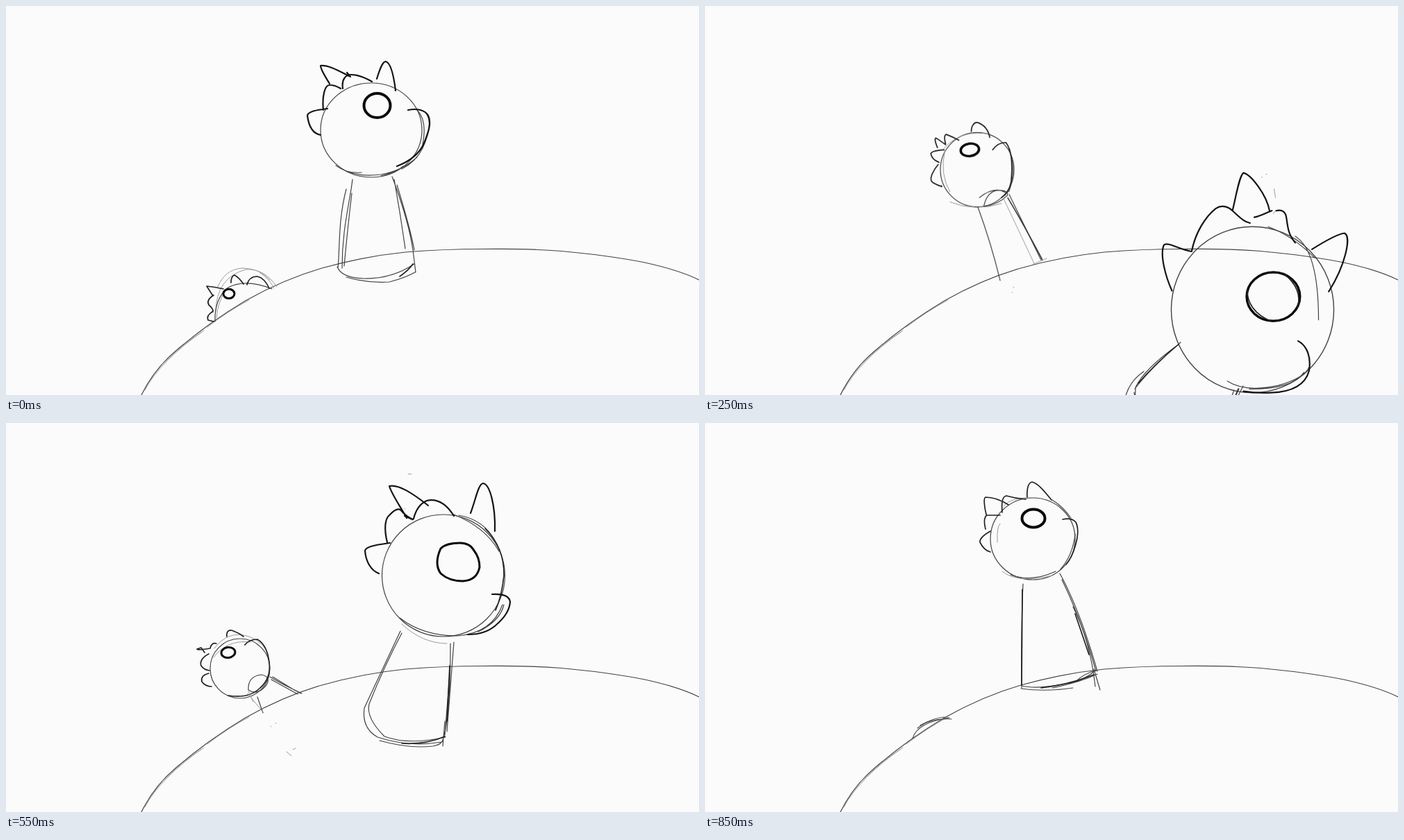
An HTML page without scripts for the animation above (900 ms loop, 998 px wide and 561 px high).

```html
<!DOCTYPE html>
<html lang="en">
<head>
<meta charset="utf-8">
<title>Hopping creature, pencil test</title>
<style>
  html, body { margin: 0; width: 100%; height: 100%; overflow: hidden; background: #fbfbfb; }
  svg { display: block; width: 998px; height: 561px; }
  path, ellipse {
    fill: none; stroke: #424242; stroke-width: 1.2;
    stroke-linecap: round; stroke-linejoin: round; vector-effect: non-scaling-stroke;
  }
  .bold { stroke: #141414; stroke-width: 2.2; }
  .mid { stroke: #222; stroke-width: 1.7; }
  .eye { stroke: #0a0a0a; stroke-width: 4; }
  .eye.slim { stroke-width: 3; }
  .faint { stroke: #9a9a9a; stroke-width: 1; }

  /* Nine drawings, 50 ms each */
  .pose {
    visibility: hidden;
    animation: show 450ms step-end infinite;
    animation-delay: calc(var(--i) * 50ms - 450ms);
  }
  @keyframes show {
    0% { visibility: visible; }
    11.1111%, 100% { visibility: hidden; }
  }
</style>
</head>
<body>
<svg viewBox="0 0 998 561">
  <filter id="pencil" filterUnits="userSpaceOnUse" x="0" y="0" width="998" height="561" color-interpolation-filters="sRGB">
    <feTurbulence type="fractalNoise" baseFrequency=".6" numOctaves="2" seed="4"/>
    <feDisplacementMap in="SourceGraphic" scale="1.3" xChannelSelector="R" yChannelSelector="G"/>
  </filter>

  <g filter="url(#pencil)">
    <g id="hill">
      <path d="M195 561Q213 524 245 497Q290 458 345 425Q400 394 455 378Q515 361 575 355Q630 350.500 685 350.500Q750 349.500 800 353.500Q870 360 920 370Q970 381 998 395"/>
      <path class="faint" d="M200 554Q222 512 285 468M225 517Q255 487 282 470M290 463Q320 440 350 424"/>
    </g>

    <g class="pose" style="--i:0">
      <g id="peek">
        <path class="faint" d="M302 440Q303 392 345 380Q372 378 390 405M305 405Q315 380 340 378Q365 378 380 395M303 450Q305 425 318 408M365 384Q380 394 386 407"/>
        <path d="M301 455Q300 422 320 406Q345 393 383 408"/>
        <path class="mid" d="M313 408Q300 405 289 404L298 418M299 417Q288 424 292 431Q299 437 298 441M297 441Q288 447 291 453L299 455M324 399Q324 390 329 388Q336 392 342 401M347 402Q350 390 362 390Q372 392 379 407"/>
        <ellipse class="eye slim" cx="321" cy="415" rx="8" ry="6.700"/>
      </g>
      <g id="tall">
        <ellipse cx="526" cy="179" rx="73" ry="68"/>
        <path d="M475 230Q500 248 540 243Q570 238 592 218M490 238Q500 241 512 240M540 245Q562 240 572 231M605 155Q616 170 600 205Q590 225 570 235M592 150Q607 165 600 200"/>
        <path class="bold" d="M466 112C460 102 453 92 453 86C465 85 480 94 494 101M491 96L496 102M485 119C483 106 489 99 497 99Q510 99 527 109M457 150C455 130 459 114 466 114Q474 114 482 119M463 148C447 150 435 152 434 158C436 174 442 184 453 186M534 105C538 92 542 80 547 80C553 82 558 97 561 122M579 150C594 147 604 151 608 158C614 170 606 187 602 198Q592 220 563 231"/>
        <ellipse class="eye" cx="534.500" cy="143.500" rx="19" ry="17.500"/>
        <path d="M499 250C495 285 484 320 484 378M490 264C478 310 481 350 478 378M498 270Q492 320 487 375M556 246Q580 310 586 352L590 384M559 250Q568 300 575 350M563 258Q582 320 588 352M477 376Q483 392 515 393Q555 394 588 372M490 391Q520 400 552 398Q575 392 589 384"/>
        <path class="mid" d="M567 390Q580 381 586 372"/>
      </g>
    </g>

    <g class="pose" style="--i:1">
      <use href="#low-head" transform="translate(-20 36)"/>
      <use href="#lean" transform="translate(574 192) scale(.94) translate(-630 -220)"/>
    </g>

    <g class="pose" style="--i:2">
      <g id="low-head">
        <ellipse cx="337" cy="354" rx="43" ry="43"/>
        <path class="faint" d="M300 325Q320 298 350 308Q372 316 378 335M299 338Q318 312 352 316"/>
        <path d="M349 385Q348 365 368 363Q382 366 375 378Q362 394 349 385"/>
        <path class="mid" d="M318 308Q317 298 325 299Q336 303 342 308M294 325Q275 328 275 326L281 324L286 331M294 325Q296 316 303 318M292 333C282 338 279 345 281 350Q285 356 293 357M292 361Q280 364 282 373Q287 380 296 380M344 320Q350 312 362 312Q376 320 379 345Q382 368 366 382Q350 398 320 393"/>
        <ellipse class="eye slim" cx="320" cy="331" rx="10" ry="7.500" transform="rotate(-8 320 331)"/>
      </g>
      <path d="M380 366Q400 378 426 390M382 370L420 391M384 366L415 385L425 390M362 395L370 418"/>
      <path class="faint" d="M348 390L371 418M349 387L356 402M381 437l1 1M388 433l1 0M413 471l4-2M404 474l7 6"/>
      <g id="lean">
        <ellipse cx="630" cy="220" rx="88.500" ry="88"/>
        <path d="M645 132Q690 150 710 185M652 133Q690 140 705 172M567 281Q600 307 650 307Q700 303 715 262M717 262Q712 285 680 301"/>
        <path class="faint" d="M570 290Q600 318 635 318M579 74Q582 72 584 74M574 123l1 1"/>
        <path class="mid" d="M690 152Q718 180 717 220Q714 250 705 270"/>
        <path class="bold" d="M574 134L585 139M577 137C569 122 556 104 552 91C565 88 585 101 608 119M587 138Q592 118 606 112Q628 107 645 134M549 172C544 152 546 138 552 133Q562 122 568 125Q576 135 586 139M553 173C540 175 519 177 517 184C518 200 526 213 537 217M669 130C676 112 680 88 687 87C697 88 705 120 704 156M700 247C716 246 725 250 726 258Q725 275 705 292Q690 305 665 305"/>
        <path class="eye slim" d="M626 181Q634 173 654 173Q668 173 674 184Q682 194 682 208Q678 227 658 228Q638 228 626 217Q616 203 626 181Z"/>
        <path d="M568 300L516 411Q512 440 535 453Q580 468 628 460Q640 430 640 318M570 303Q545 350 523 405Q518 425 545 452Q580 465 633 453M645 316L635 445M640 350L632 450M632 430L629 466M538 458Q580 470 615 466Q628 464 630 455"/>
        <path class="mid" d="M570 462Q605 464 632 452M639 350L635 430"/>
      </g>
    </g>

    <g class="pose" style="--i:3">
      <use href="#rise-head" transform="translate(346 309) scale(.93) translate(-367 -268)"/>
      <use href="#rise-body" transform="matrix(1 0 0 .6 -20 166)"/>
      <use href="#near-head" transform="translate(690 276) scale(.91) translate(-744 -346)"/>
      <use href="#near-body" transform="translate(-36 -66)"/>
    </g>

    <g class="pose" style="--i:4">
      <g id="rise-head">
        <ellipse cx="367" cy="268" rx="50" ry="50.500"/>
        <path class="faint" d="M321 240Q345 212 385 220M330 312Q365 326 400 314M323 242Q316 275 330 298"/>
        <path d="M376 318Q380 298 395 296Q410 296 408 303Q395 316 376 318M370 306Q390 290 405 299M410 240Q421 268 410 298"/>
        <path class="mid" d="M359 216C359 208 363 203 368 204C376 207 382 213 384 224M313 238Q308 226 311 225Q316 228 324 234M324 233Q321 221 325 220Q333 223 342 228M322 241Q306 242 304 246Q305 254 315 258M314 261C308 268 302 279 305 284Q309 288 319 291M388 241Q395 231 406 231Q417 245 413 285Q410 300 400 306"/>
        <ellipse class="eye" cx="357" cy="241" rx="12.500" ry="8.500" transform="rotate(-8 357 241)" style="stroke-width:3.5"/>
      </g>
      <g id="rise-body">
        <path d="M367 318Q386 360 399 404M412 303L458 380"/>
        <path class="mid" d="M410 307Q432 337 460 380" style="stroke-width:1.4"/>
        <path class="faint" d="M404 308L448 384M446 385L466 378M418 412l1 0M416 418l1 0"/>
      </g>
      <g id="near-head">
        <ellipse cx="744.500" cy="346" rx="111.500" ry="114" style="stroke-width:1.4"/>
        <path d="M803 245Q835 265 835 360M766 232Q800 245 830 275M710 444Q735 460 780 450Q815 440 822 425M815 432Q800 455 740 455"/>
        <path class="faint" d="M757 164l1 0M763 160l1 0M774 180l2 12M773 214l3-4"/>
        <path class="bold" d="M634 320C625 300 617 270 623 257C628 252 645 264 661 266C666 240 680 218 694 207C703 201 712 205 718 211C726 218 732 225 741 227M717 210C722 190 726 163 732 158C742 160 764 188 768 211M747 219C756 217 765 212 771 210M777 210C786 208 790 212 791 220C793 235 794 243 803 254M826 263C842 253 862 241 871 241C880 246 872 285 849 321M807 389C820 396 825 412 822 430C816 452 795 459 770 460Q750 461 732 458"/>
        <ellipse class="eye" cx="773" cy="328" rx="36.500" ry="33.500" style="stroke-width:3.500"/>
        <path class="mid" d="M737 318Q737 348 770 362M788 297Q814 318 806 344"/>
      </g>
      <g id="near-body">
        <path d="M643 393Q600 430 577 460M640 396Q590 432 578 458Q575 500 600 545M590 435Q560 455 561 495Q567 545 615 561M576 465Q580 520 607 550Q640 552 672 556Q690 540 727 460M720 462L683 555M733 456Q710 500 690 545M600 549L685 555"/>
        <path class="mid" d="M577 470Q580 515 606 549M640 396Q606 424 582 452M726 460Q700 525 676 556" style="stroke-width:1.4"/>
        <path class="faint" d="M652 561Q690 555 702 543M579 470Q575 515 604 549"/>
      </g>
    </g>

    <g class="pose" style="--i:5">
      <use href="#rise-head" transform="translate(392 236) scale(1.06) translate(-367 -268)"/>
      <use href="#rise-body" transform="matrix(1 0 0 1.23 26 -101)"/>
      <use href="#near-head" transform="translate(788 438) scale(1.05) translate(-744 -346)"/>
      <use href="#near-body" transform="translate(42 92)"/>
    </g>

    <g class="pose" style="--i:6">
      <use href="#stretch-head" transform="translate(417 204) scale(.95) translate(-441 -179)"/>
      <use href="#stretch-body" transform="matrix(1 0 0 .86 -22 52)"/>
      <use href="#near-head" transform="translate(808 540) scale(1.07) translate(-744 -346)"/>
    </g>

    <g class="pose" style="--i:7">
      <g id="stretch-head">
        <ellipse cx="441" cy="179" rx="59" ry="60"/>
        <path d="M470 124Q495 140 495 190M385 165Q380 205 410 234M388 185Q400 222 430 240M480 121Q505 145 502 200"/>
        <path class="faint" d="M384 170Q392 135 434 126M389 205Q402 237 432 243"/>
        <path class="mid" d="M379 139C375 127 373 116 376 115Q390 116 397 120M397 133Q397 120 405 118Q413 117 422 123M383 139Q370 141 370 147Q372 157 380 160M381 161Q365 173 365 180Q372 192 382 193M443 116C441 104 442 93 446 92C456 94 463 105 467 119M479 150C490 143 500 142 508 144C518 149 513 176 508 195Q505 205 498 214"/>
        <ellipse class="eye" cx="446" cy="149" rx="18.500" ry="14.500" style="stroke-width:4.500"/>
      </g>
      <g id="stretch-body">
        <path d="M431 245Q433 310 440 390M430 247Q428 300 436 360M434 250Q440 330 452 375M484 231Q515 320 541 372M492 250Q510 320 537 361M453 376Q490 378 537 361M440 380Q470 383 490 379Q515 366 537 363"/>
        <path class="mid" d="M497 374L532 365"/>
      </g>
      <path d="M735 552Q780 510 845 509Q895 510 936 550M903 518Q920 535 928 561M885 505Q915 525 926 556"/>
      <path class="faint" d="M888 462l2 0M884 541l4 3M893 553l5 4M852 523l3 1"/>
      <path class="bold" d="M740 546C735 533 737 522 745 517C755 510 767 517 777 517Q790 500 815 493Q830 491 834 506M842 499C852 492 862 451 873 451C882 451 890 485 893 518M848 504Q868 490 896 515M896 504L889 518"/>
    </g>

    <g class="pose" style="--i:8">
      <path d="M299 455Q305 432 352 425M306 440Q325 425 355 427M310 436Q330 425 345 424"/>
      <ellipse cx="472" cy="167" rx="61" ry="59"/>
      <path class="faint" d="M430 120Q440 106 478 108M421 172Q420 150 425 145M428 214Q450 232 500 220"/>
      <path d="M440 219Q470 230 505 214M500 111Q515 120 527 137M533 160Q530 190 512 211"/>
      <path class="mid" d="M405 132C402 120 401 108 404 107Q420 107 437 118M428 129Q426 106 434 105Q448 109 462 110M404 153Q400 137 406 133L425 133M411 156Q395 165 396 172Q402 184 411 186M464 107C463 94 466 86 471 85C480 87 490 100 499 111M515 139Q528 136 534 143Q540 155 533 178Q528 195 520 204"/>
      <ellipse class="eye" cx="473" cy="137.500" rx="16.500" ry="13"/>
      <path d="M458 232Q455 300 456 382M511 217Q540 270 565 358M514 226Q545 290 563 358M530 265Q555 315 562 380M560 355L569 385M456 379Q480 385 530 374Q550 368 562 357M455 383Q490 388 530 382M500 382Q540 374 565 362M535 372Q545 362 562 357"/>
      <path class="mid" d="M457 240L456 378M484 382Q525 377 560 363M533 275L553 334"/>
    </g>
  </g>
</svg>
</body>
</html>
```
